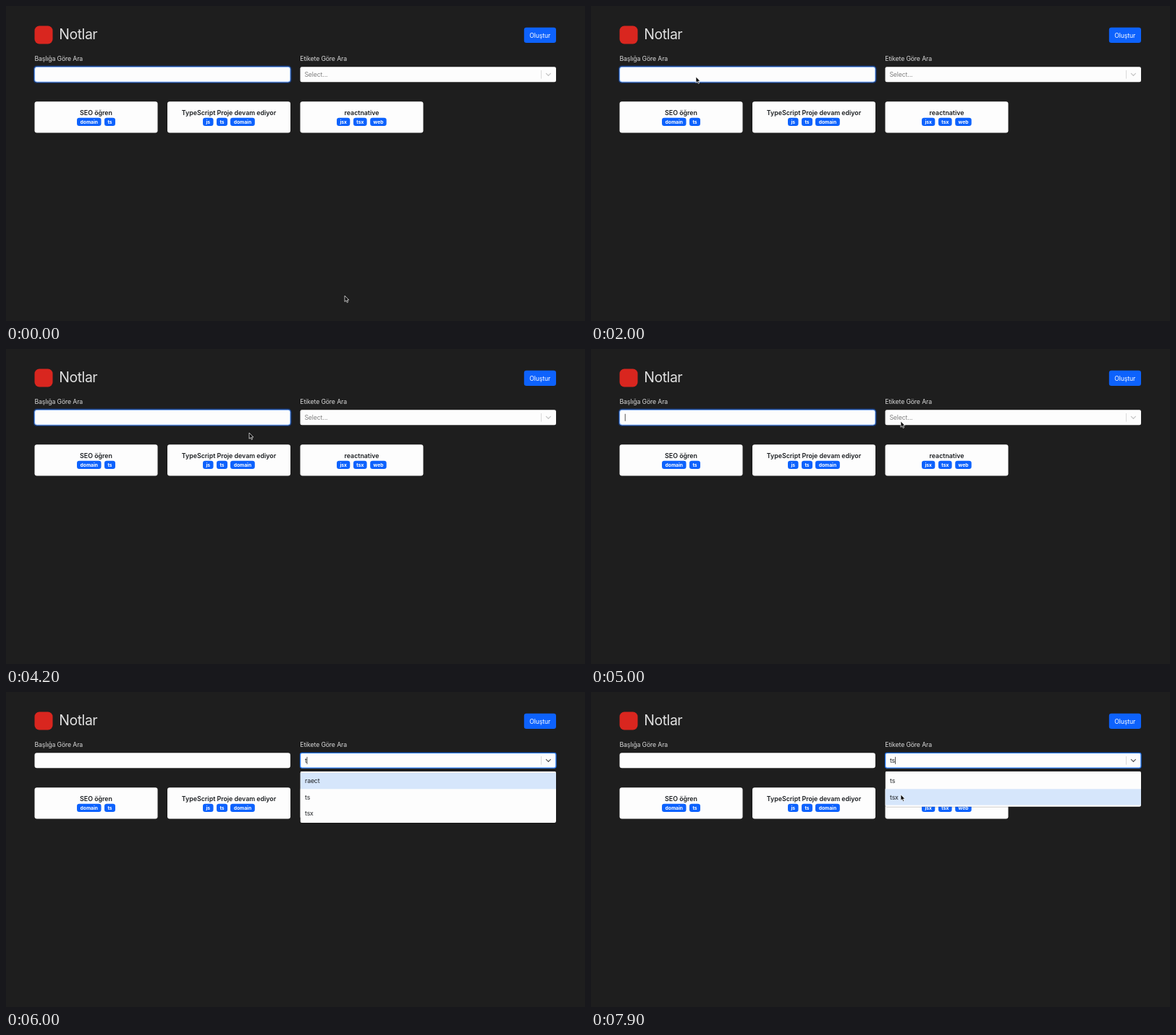
An HTML page for the animation above (8000 ms loop, 800 px wide and 436 px high).

```html
<!DOCTYPE html>
<html lang="tr">
<head>
<meta charset="utf-8">
<title>Notlar</title>
<style>
  html, body { margin: 0; width: 100%; height: 100%; overflow: hidden; background: #1e1e1e; }
  svg { display: block; width: 100vw; height: 100vh; }
  text { font: 400 8.7px Inter, "Liberation Sans", sans-serif; letter-spacing: -.12px; }
  .heading { font-size: 19.4px; letter-spacing: -.42px; }
  .title { font-size: 8.8px; font-weight: 600; letter-spacing: 0; text-anchor: middle; }
  .badge { font-size: 6.75px; font-weight: 700; letter-spacing: 0; text-anchor: middle; }
</style>
</head>
<body>
<svg id="stage" viewBox="0 0 800 436"></svg>
<script>
const stage = document.getElementById('stage');
const LOOP = 8000, STEP = 100;
const BLUE = '#0d62fd', PAPER = '#fdfdfd', INK = '#1b1e21', ACTIVE = '#d6e6fb';
const ROW = 22.28, MENU_TOP = 109.8, MENU_MAX = 166.7, PAD = 2.2;
const TAGS = ['raect', 'js', 'ts', 'generic', 'domain', 'jsx', 'tsx', 'web'];

function add(parent, tag, attrs, content) {
  const el = document.createElementNS('http://www.w3.org/2000/svg', tag);
  for (const key in attrs) el.setAttribute(key, attrs[key]);
  if (content !== undefined) el.textContent = content;
  parent.appendChild(el);
  return el;
}
const set = (el, attrs) => { for (const key in attrs) el.setAttribute(key, attrs[key]); };
const show = (el, on) => el.setAttribute('visibility', on ? 'visible' : 'hidden');
const rect = (parent, x, y, width, height, rx, fill, more) =>
  add(parent, 'rect', { x, y, width, height, rx, fill, ...more });
const text = (parent, x, y, fill, content, more) =>
  add(parent, 'text', { x, y, fill, ...more }, content);

// Header
rect(stage, 0, 0, 800, 436, 0, '#1e1e1e');
rect(stage, 39.5, 27.5, 25, 25, 6.5, '#d9261f');
text(stage, 73.3, 45.6, '#e2e2e2', 'Notlar', { class: 'heading' });
rect(stage, 715.8, 29.8, 44.2, 21.2, 3.3, BLUE);
text(stage, 723.2, 43.7, '#fff', 'Oluştur');
text(stage, 39.5, 76.2, '#d8d8d8', 'Başlığa Göre Ara');
text(stage, 406.3, 76.2, '#d8d8d8', 'Etikete Göre Ara');

// Title search
const glow = rect(stage, 37.9, 82.6, 356.6, 24.2, 4.4, BLUE, { 'fill-opacity': .38 });
rect(stage, 39.5, 84.2, 353.4, 21, 3.2, PAPER);
const ring = rect(stage, 39.6, 84.3, 353.2, 20.8, 3.2, 'none', { stroke: '#5d9bfa', 'stroke-width': .8 });
const query = text(stage, 46.8, 98, INK, '');
const queryCaret = rect(stage, 0, 89.8, .7, 10, 0, '#111');

// Tag select
rect(stage, 406.5, 84.2, 353.5, 21, 2.3, PAPER);
const selectRing = rect(stage, 406.6, 84.3, 353.3, 20.8, 2.3, 'none', { stroke: '#2477f2', 'stroke-width': 1.3 });
const placeholder = text(stage, 412.4, 98, '#808080', 'Select...');
const tagQuery = text(stage, 412.9, 98, INK, '');
const tagCaret = rect(stage, 0, 89.8, .7, 10, 0, '#111');
rect(stage, 739, 89, .7, 11.6, 0, '#c9c9c9');
const chevron = add(stage, 'path', {
  d: 'M746.4 93.4 L749.4 96.4 L752.4 93.4', fill: 'none', 'stroke-width': 1.2, 'stroke-linecap': 'round'
});

// Cards: title and badges as [label, left, width]
const cards = [
  ['SEO öğren', [['domain', 98, 33.5], ['ts', 136, 15]]],
  ['TypeScript Proje devam ediyor', [['js', 272, 14.5], ['ts', 291, 15], ['domain', 310, 33.8]]],
  ['reactnative', [['jsx', 457, 18.3], ['tsx', 480, 18.6], ['web', 503.2, 22.5]]]
].map(([name, badges], i) => {
  const x = 39.5 + i * 183.5, g = add(stage, 'g', {});
  rect(g, x, 132.2, 170, 43.2, 3.2, PAPER);
  text(g, x + 85, 151.3, INK, name, { class: 'title' });
  for (const [label, left, width] of badges) {
    rect(g, left, 154.7, width, 11.3, 3.3, BLUE);
    text(g, left + width / 2, 162.8, '#fff', label, { class: 'badge' });
  }
  return { name: name.toLowerCase(), g };
});

// Dropdown
const clip = rect(add(add(stage, 'defs', {}), 'clipPath', { id: 'menuClip' }), 406.5, MENU_TOP, 353.5, MENU_MAX, 2.3, '#000');
const menu = add(stage, 'g', {});
const shade = rect(menu, 405.9, MENU_TOP - .5, 354.7, 0, 2.8, '#000', { 'fill-opacity': .18 });
const list = add(menu, 'g', { 'clip-path': 'url(#menuClip)' });
rect(list, 406.5, MENU_TOP, 353.5, MENU_MAX, 0, PAPER);
const active = rect(list, 406.5, 0, 353.5, ROW, 0, ACTIVE);
const options = TAGS.map(() => text(list, 413, 0, INK, ''));

const pointer = add(stage, 'path', {
  d: 'M0 0 V8.3 L1.9 6.5 L3.2 9.4 L4.6 8.8 L3.3 6 H5.8 Z',
  fill: '#080808', stroke: '#fff', 'stroke-width': .7, 'stroke-linejoin': 'round'
});

// Pointer keys: time, x, y
const path = [
  [0, 468, 401], [100, 482, 384], [200, 425, 270], [300, 262, 142], [400, 160, 104],
  [600, 160, 104], [900, 145, 98], [4000, 145, 98], [4200, 336, 116], [4400, 405, 106],
  [4600, 428, 100], [7100, 428, 100], [7600, 428, 142], [LOOP, 428, 142]
];
function pointerAt(t) {
  const i = path.findIndex(key => key[0] > t);
  const [t0, x0, y0] = path[i - 1], [t1, x1, y1] = path[i];
  const k = (t - t0) / (t1 - t0);
  return [x0 + (x1 - x0) * k, y0 + (y1 - y0) * k];
}

const within = (t, from, to) => t >= from && t < to;
// Half a second on, half a second off, counted from the last key or focus
const blink = (t, from) => (t - from + 2000) % 1000 < 500;

function placeCaret(caret, field, on) {
  const width = field.textContent ? field.getComputedTextLength() : 0;
  caret.setAttribute('x', +field.getAttribute('x') + width);
  show(caret, on);
}

function drawMenu(open, typed, y) {
  show(menu, open);
  const found = TAGS.filter(tag => tag.includes(typed));
  const height = Math.min(MENU_MAX, found.length * ROW + 2 * PAD);
  const chosen = typed === 'ts' && y > MENU_TOP + PAD + ROW ? 1 : 0;
  clip.setAttribute('height', height);
  shade.setAttribute('height', height + 1.4);
  active.setAttribute('y', MENU_TOP + PAD + chosen * ROW);
  options.forEach((option, i) => {
    option.textContent = found[i] || '';
    option.setAttribute('y', MENU_TOP + PAD + ROW * i + 14.4);
  });
}

function draw(t) {
  const [x, y] = pointerAt(t);
  const open = t >= 5100;
  const search = within(t, 2300, 3500) ? 'se' : within(t, 2200, 3600) ? 's' : '';
  const typed = t >= 6500 ? 'ts' : t >= 5700 ? 't' : '';

  query.textContent = search;
  const keyTime = t < 2200 ? 100 : t < 3500 ? 2300 : 3600;
  placeCaret(queryCaret, query, !open && blink(t, keyTime));
  glow.setAttribute('opacity', t < 5100 ? 1 : t < 5200 ? .25 : 0);
  ring.setAttribute('opacity', t < 5100 ? 1 : t < 5200 ? .6 : 0);

  for (const card of cards) show(card.g, card.name.includes(search));

  show(selectRing, open);
  show(placeholder, !typed);
  chevron.setAttribute('stroke', open ? '#555' : '#c4c4c4');
  tagQuery.textContent = typed;
  const tagOff = within(t, 5600, 5700) || within(t, 7100, 7600);
  placeCaret(tagCaret, tagQuery, open && !tagOff);
  drawMenu(open, typed, y);

  set(pointer, { transform: `translate(${x} ${y})` });
  show(pointer, !within(t, 2200, 4000) && !within(t, 5700, 7100));
}

const start = performance.now();
function frame(now) {
  const t = Math.max(0, now - start) % LOOP;
  draw(Math.floor(t / STEP) * STEP);
  requestAnimationFrame(frame);
}
draw(0);
requestAnimationFrame(frame);
</script>
</body>
</html>
```
